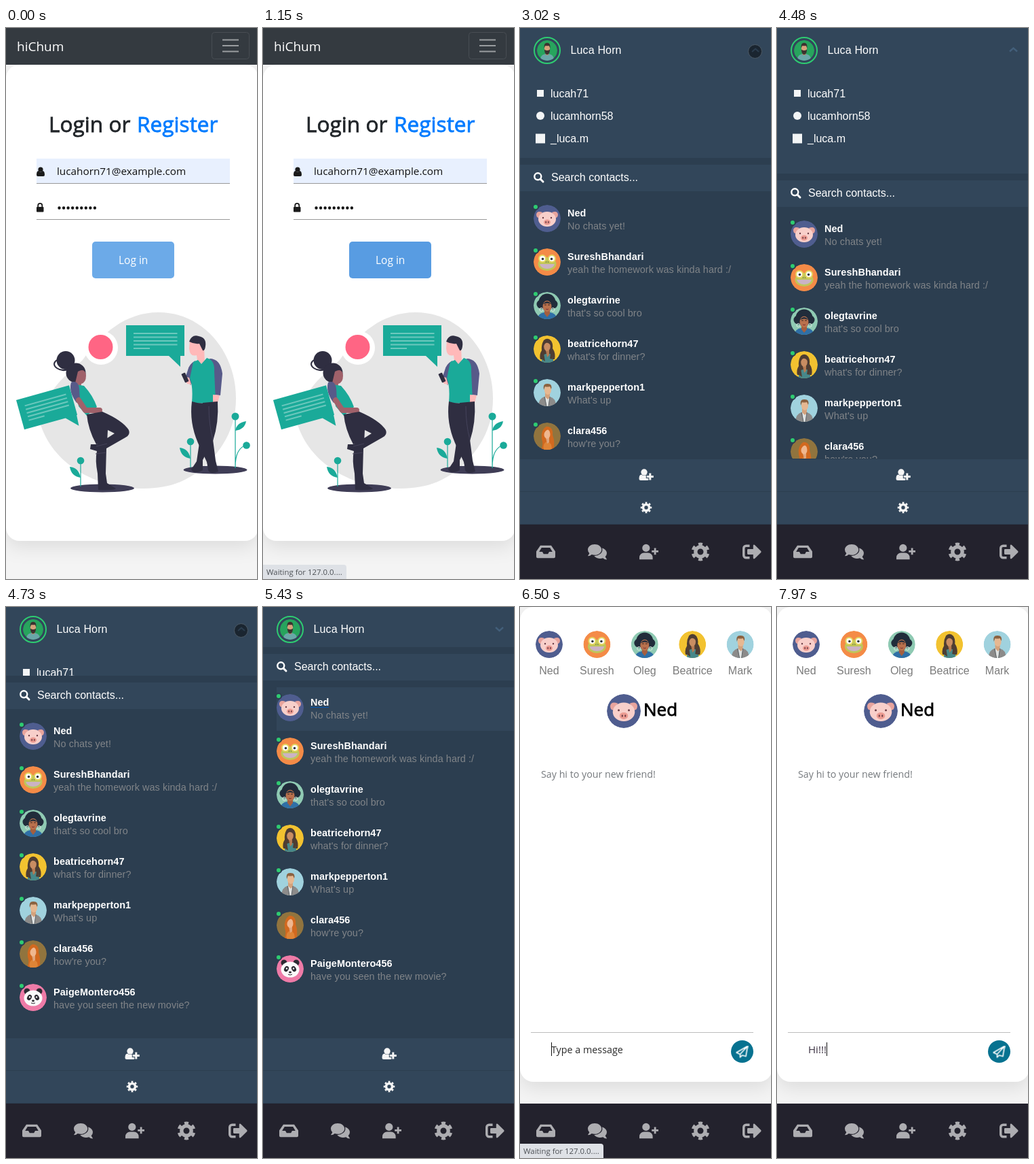
These frames come from a looping animation (370x810 px, 8 s). An HTML page:

```html
<!DOCTYPE html>
<html lang="en">
<head>
<meta charset="utf-8">
<title>Chat app</title>
<style>
html,body{margin:0;width:100%;height:100%;overflow:hidden;background:#f4f4f4}
svg{display:block}
#stage{width:370px;height:810px}
text{white-space:pre}
.ui{font-family:"Open Sans","Noto Sans",sans-serif}
.ar{font-family:"Liberation Sans",Arial,sans-serif;font-size:16px}
.name{font-weight:700;font-size:14.4px;letter-spacing:.1px;fill:#fff}
.last{font-size:14.4px;letter-spacing:.08px;fill:#808488}
.medium{stroke-width:.8}
.card{fill:#fff;filter:drop-shadow(0 10px 13px rgba(0,0,0,.09))}
.teal{fill:#1aaa99}.dark{fill:#2f2e41}.skin{fill:#ffb9b9}.brown{fill:#a0616a}.plum{fill:#575a89}
.stem{fill:none;stroke:#1aaa99;stroke-width:1.2}
.lines{stroke:#6cc8bd;stroke-width:2}

/* one shared 8 s clock; every value holds until the next key */
.t{animation:8s step-end infinite}
#login{animation-name:login}
#app{animation-name:app}
#chat{animation-name:chat}
#submit{animation-name:submit}
#wait{animation-name:wait}
.late{animation-name:late}
#slide{animation-name:slide}
.up{animation-name:up}
.down{animation-name:down}
#press{animation-name:press}
#hover{animation-name:hover}
#under{animation-name:under}
#sendicon{animation-name:sendicon}
#bar{animation-name:bar}
#hint{animation-name:hint}
#caret{animation-name:caret}
.k1{animation-name:k1}.k2{animation-name:k2}.k3{animation-name:k3}.k4{animation-name:k4}.k5{animation-name:k5}
@keyframes login{0%{opacity:1}23.125%,to{opacity:0}}
@keyframes app{0%{opacity:0}23.125%{opacity:1}73.5%,to{opacity:0}}
@keyframes chat{0%{opacity:0}73.5%,to{opacity:1}}
@keyframes submit{0%{fill:#6caae8}11.75%{fill:#62a2e4}12.625%,to{fill:#589ce2}}
@keyframes wait{0%{opacity:0}13.5%{opacity:.5}14.375%{opacity:1}33.625%{opacity:.8}34.625%{opacity:.5}
 35.625%{opacity:.2}36.625%{opacity:0}73.5%{opacity:1}83.125%{opacity:.8}84.125%{opacity:.6}
 85.125%{opacity:.4}86.125%{opacity:.2}87.125%,to{opacity:0}}
@keyframes late{0%{opacity:0}24.125%,to{opacity:1}}
@keyframes slide{0%{transform:translateY(0)}36.625%{transform:translateY(67px)}37.75%{transform:translateY(132px)}
 38.75%{transform:translateY(151px)}39.625%{transform:translateY(155px)}57.875%{transform:translateY(124px)}
 58.875%{transform:translateY(42px)}60%{transform:translateY(8px)}61%,to{transform:translateY(0)}}
@keyframes up{0%{opacity:0}36.625%{opacity:1}57.875%,to{opacity:0}}
@keyframes down{0%{opacity:0}24.125%{opacity:1}36.625%{opacity:0}57.875%,to{opacity:1}}
@keyframes press{0%{opacity:0}33.625%{opacity:1}39.625%{opacity:0}56.875%{opacity:1}61%,to{opacity:0}}
@keyframes hover{0%{opacity:0}66.625%,to{opacity:1}}
@keyframes under{0%{opacity:0}67.875%,to{opacity:1}}
@keyframes sendicon{0%{opacity:0}74.5%,to{opacity:1}}
@keyframes bar{0%{opacity:0}74.5%{opacity:.5}76.5%{opacity:.4}77.5%{opacity:.3}79.375%{opacity:.2}80.25%{opacity:.1}81.25%,to{opacity:0}}
@keyframes hint{0%{opacity:1}89%,to{opacity:0}}
@keyframes caret{0%{opacity:0;transform:translateX(0)}81.25%{opacity:1;transform:translateX(0)}
 87.125%{opacity:0;transform:translateX(0)}89%{opacity:1;transform:translateX(11px)}
 92.875%{opacity:1;transform:translateX(14px)}96.625%{opacity:1;transform:translateX(19px)}
 98.75%{opacity:1;transform:translateX(23px)}99.625%,to{opacity:1;transform:translateX(27px)}}
@keyframes k1{0%{opacity:0}89%,to{opacity:1}}
@keyframes k2{0%{opacity:0}92.875%,to{opacity:1}}
@keyframes k3{0%{opacity:0}96.625%,to{opacity:1}}
@keyframes k4{0%{opacity:0}98.75%,to{opacity:1}}
@keyframes k5{0%{opacity:0}99.625%,to{opacity:1}}
</style>
</head>
<body>
<svg id="stage" viewBox="0 0 370 810">
<defs>
 <clipPath id="disc"><circle r="20"/></clipPath>

 <!-- avatars, 40 px wide around the origin -->
 <g id="pig" clip-path="url(#disc)"><circle r="20" fill="#4f5d8f"/>
  <path d="M-7-9Q-15-12-16-6Q-16-1-12-1ZM7-9Q15-12 16-6Q16-1 12-1Z" fill="#e8a49d"/>
  <ellipse cy="1" rx="13" ry="11" fill="#f8cfca"/><ellipse cy="5.5" rx="5" ry="4" fill="#ec9b92"/>
  <g fill="#6b3d45"><circle cx="-6" cy="-1" r="1.2"/><circle cx="6" cy="-1" r="1.2"/><ellipse cx="-1.8" cy="5.5" rx=".9" ry="1.4"/><ellipse cx="1.8" cy="5.5" rx=".9" ry="1.4"/></g></g>
 <g id="frog" clip-path="url(#disc)"><circle r="20" fill="#f48b47"/>
  <ellipse cy="3" rx="13.5" ry="10" fill="#bfc65a"/><g fill="#e5d65f"><circle cx="-7" cy="-5" r="6"/><circle cx="7" cy="-5" r="6"/></g>
  <g fill="#fff"><circle cx="-7" cy="-5" r="4"/><circle cx="7" cy="-5" r="4"/></g><g fill="#33373f"><circle cx="-6.5" cy="-4.5" r="1.8"/><circle cx="6.5" cy="-4.5" r="1.8"/></g>
  <path d="M-11 3H11Q9 10 0 10T-11 3Z" fill="#cbb3c4"/><circle cx="-1.5" cy="0" r=".8" fill="#667038"/><circle cx="1.5" cy="0" r=".8" fill="#667038"/></g>
 <g id="afro" clip-path="url(#disc)"><circle r="20" fill="#8fcab3"/>
  <circle cy="-5" r="12.500" fill="#212c3b"/><circle cx="-9" cy="-2" r="6.500" fill="#212c3b"/><circle cx="9" cy="-2" r="6.500" fill="#212c3b"/>
  <path d="M-15 20Q-13 11-4 10H4Q13 11 15 20Z" fill="#2f6fa6"/><path d="M-4 6H4V12L0 17L-4 12Z" fill="#a45f3f"/>
  <ellipse cy="1" rx="6.5" ry="8.2" fill="#b9714d"/><path d="M-6-2Q0-10 6-2Q0-5-6-2" fill="#212c3b"/>
  <path d="M-4-1H-1M1-1H4" stroke="#3b2420"/><path d="M-2 5Q0 6.5 2 5" stroke="#7d2f32" fill="none"/>
  <g fill="none" stroke="#dce6df"><circle cx="-8.5" cy="6" r="2.6"/><circle cx="8.5" cy="6" r="2.6"/></g></g>
 <g id="wavy" clip-path="url(#disc)"><circle r="20" fill="#f2c230"/>
  <path d="M-5-13Q1-18 6-12Q9-7 8-1Q13 6 11 15H-10Q-12 8-8 2Q-9-6-5-13Z" fill="#4e3d33"/>
  <path d="M-8 20Q-9 8-2 7H4Q10 9 9 20Z" fill="#47888a"/><path d="M-2 2H3V9L0 12Z" fill="#b67a52"/><ellipse cy="-4" rx="4.8" ry="7" fill="#c98d62"/>
  <path d="M-5-5Q-1-13 5-6Q6-11 0-13T-5-5ZM-6 0L-3 18L-9 14ZM6 0L4 14L9 15Z" fill="#4e3d33"/></g>
 <g id="suit" clip-path="url(#disc)"><circle r="20" fill="#a0d2de"/>
  <path d="M-13 20Q-12 8-4 6H4Q13 8 13 20Z" fill="#8c8b8a"/><path d="M-3 5H4L2 20H-1Z" fill="#dfe2e1"/><path d="M-3 0H4V7L1 10L-3 6Z" fill="#d3a27c"/>
  <ellipse cx="1" cy="-4" rx="5" ry="7" fill="#e6b891"/><path d="M-5-4Q-7-14 1-13Q8-13 6-5L4-9Q-1-8-3-9Z" fill="#8b6240"/>
  <path d="M-4 6L-1 20M4 6L2 20" stroke="#5e6468"/></g>
 <g id="ginger" clip-path="url(#disc)"><circle r="20" fill="#91743e"/>
  <path d="M-7-7Q-4-15 2-14Q9-12 8-2Q12 9 9 20H-9Q-5 12-8 4Q-9-2-7-7Z" fill="#d2691f"/>
  <path d="M-5 20Q-7 10 0 8Q7 9 7 20Z" fill="#df8436"/><path d="M-2 2H3V9L0 11Z" fill="#dfa57c"/><ellipse cy="-3" rx="4.6" ry="6.8" fill="#efb78f"/>
  <path d="M-5-2Q-3-9 2-10Q5-7 5-1Q8-8 2-13T-5-2Z" fill="#d2691f"/></g>
 <g id="panda" clip-path="url(#disc)"><circle r="20" fill="#ee7ba7"/>
  <g fill="#2d2b33"><circle cx="-9" cy="-9" r="4.5"/><circle cx="9" cy="-9" r="4.5"/></g><ellipse cy="1" rx="13.5" ry="11.5" fill="#fafafa"/>
  <g fill="#2d2b33"><ellipse cx="-5.5" cy="0" rx="3.2" ry="4.2" transform="rotate(30 -5.5 0)"/><ellipse cx="5.5" cy="0" rx="3.2" ry="4.2" transform="rotate(-30 5.5 0)"/><ellipse cy="5" rx="2" ry="1.4"/></g>
  <circle cx="-5" cy="-.5" r="1.2" fill="#fff"/><circle cx="5" cy="-.5" r="1.2" fill="#fff"/><path d="M-3 8Q0 10 3 8" fill="none" stroke="#2d2b33"/></g>
 <g id="beard" clip-path="url(#disc)"><circle r="20" fill="#27a45d"/>
  <path d="M-14 20Q-13 8-4 7H4Q13 8 14 20Z" fill="#6aa7a8"/><path d="M-3 2H3V9H-3Z" fill="#b98460"/><ellipse cy="-4" rx="5.5" ry="8" fill="#d6a27b"/>
  <path d="M-6-4Q-7-15 0-15T6-4L4-9H-4ZM-5.5-2Q0 2 5.5-2Q5 8 0 8T-5.5-2Z" fill="#3c3230"/></g>

 <!-- icons -->
 <g id="inbox"><path fill-rule="evenodd" d="M-8-9.3H8L14-.5V7.3Q14 9.3 12 9.3H-12Q-14 9.3-14 7.3V-.5ZM-6.2-6L-9.8 0H-5L-3.2 3.2H3.2L5 0H9.8L6.2-6Z"/></g>
 <path id="bubble" d="M-3.9-10.9C1.7-10.9 6.2-7.4 6.2-3.1S1.7 4.7-3.9 4.7Q-6.300 4.700-8.300 4Q-10.500 6.200-13.600 6.200Q-14.200 6-13.700 5.400Q-12.200 3.800-11.700 1.900Q-14-.2-14-3.100C-14-7.400-9.500-10.900-3.900-10.900Z"/>
 <g id="talk"><use href="#bubble" transform="matrix(-1 0 0 1 0 5.2)"/><use href="#bubble" stroke="#23222d" stroke-width="2.400" paint-order="stroke"/></g>
 <g id="adduser"><circle cx="-4.200" cy="-5.600" r="5.600"/><path d="M-14 11.200V8.200A6.800 6.800 0 0 1-7.200 1.400H-1.200A6.800 6.800 0 0 1 5.600 8.200V11.200ZM7.700-5.600H10.500V-2.100H14V.7H10.500V4.200H7.700V.7H4.200V-2.100H7.700Z"/></g>
 <g id="friend"><circle cx="-3" cy="-4" r="4.700"/><path d="M-10.500 5.500Q-10.500-.5-7-.5Q-3 2.500 1-.5Q5-.5 5 5.500Q5 8 2 8H-8Q-10.500 8-10.500 5.500Z"/>
  <path d="M4.300-2.500H7.300V1H10.800V4H7.300V7.500H4.300V4H.8V1H4.300Z" stroke="#32465a" stroke-width="2" paint-order="stroke"/></g>
 <g id="gear" fill="none" stroke-width="5.4"><circle r="7.2"/><circle r="10.8" pathLength="12" stroke-dasharray="1 1" stroke-dashoffset=".5" transform="rotate(-90)"/></g>
 <g id="cog" fill="none"><circle r="4.5" stroke-width="3.6"/><circle r="6.9" stroke-width="2.8" pathLength="16" stroke-dasharray="1 1" stroke-dashoffset=".5"/></g>
 <g id="exit"><path d="M-3.500-8.750H-8.750A3.500 3.500 0 0 0-12.250-5.250V5.250A3.500 3.500 0 0 0-8.750 8.750H-3.500" fill="none" stroke="#adadb1" stroke-width="3.500"/>
  <path d="M-5.700-3.900H1.750V-9.200Q2.400-11.400 4-10.100L13.200-.9Q14 0 13.200.9L4 10.100Q2.400 11.400 1.750 9.200V3.900H-5.700Q-7 3.900-7 2.600V-2.600Q-7-3.900-5.700-3.900Z"/></g>
 <g id="nav"><rect y="730" width="370" height="80" fill="#23222d"/>
  <g fill="#adadb1"><use href="#inbox" x="38" y="770"/><use href="#talk" x="114" y="770"/><use href="#adduser" x="190" y="770"/><use href="#gear" x="266" y="770" stroke="#adadb1"/><use href="#exit" x="342" y="770"/></g></g>
 <g id="leaf"><path class="stem" d="M0 0V38"/><circle r="5.3" class="teal"/><path class="teal" d="M0 25Q-14 23-16 9Q-3 10 0 25Z"/></g>
</defs>

<g id="login" class="t">
 <rect width="370" height="810" fill="#f4f4f4"/>
 <rect class="card" y="54" width="372" height="700" rx="20"/>
 <rect width="370" height="54" fill="#343a40"/>
 <text class="ui" x="16" y="34" font-size="19" fill="#fff">hiChum</text>
 <rect x="303.5" y="6.5" width="55" height="39" rx="4" fill="none" stroke="#484d53"/>
 <path d="M319 17.5H343M319 26H343M319 34.5H343" stroke="#9a9da0" stroke-width="2"/>
 <text class="ui medium" y="153" font-size="31.6"><tspan x="63" fill="#212529" stroke="#212529">Login or </tspan><tspan x="193" fill="#007bff" stroke="#007bff">Register</tspan></text>
 <rect x="45" y="192" width="285" height="36" fill="#e8f0fe"/>
 <path d="M45 228.5H330M45 281.5H330" stroke="#999"/>
 <g fill="#1b1b1b"><circle cx="51" cy="208" r="3.6"/><path d="M45 216Q45 210 48 210Q51 213 54 210Q57 210 57 216Q57 218 55 218H47Q45 218 45 216Z"/>
  <rect x="45" y="263" width="10.5" height="7.5" rx="1"/></g>
 <path d="M47.2 263.5V261A3 3 0 0 1 53.3 261V263.5" fill="none" stroke="#1b1b1b" stroke-width="1.8"/>
 <text class="ui" x="75" y="216" font-size="15.3" fill="#111">lucahorn71@example.com</text>
 <path d="M78.5 264.5H132" stroke="#111" stroke-width="4.4" stroke-linecap="round" stroke-dasharray="0 6.55"/>
 <rect id="submit" class="t" x="127" y="314" width="121" height="54" rx="5" fill="#6caae8"/>
 <text class="ui" x="187.7" y="347" font-size="15.5" fill="#fff" text-anchor="middle">Log in</text>

 <path d="M225 418C290 418 339 475 339 545C339 590 317 624 287 649C264 668 237 677 203 677C130 677 68 640 50 580C58 530 92 508 113 488C141 449 176 418 225 418Z" fill="#e6e6e6"/>
 <circle cx="140" cy="470" r="25" fill="#fff"/><circle cx="139.5" cy="469" r="18" fill="#ff6584"/>
 <path class="teal" d="M177 437H263V482H257V498L240 482H177Z"/>
 <path class="lines" d="M188 449H252.5M188 454.5H252.5M188 460H252.5M188 465.5H252.5M188 471H212"/>
 <g transform="rotate(-15.5 15 547)"><path class="teal" d="M15 547H96V592H95L94 608L78 592H15Z"/>
  <path class="lines" d="M25 558.5H88M25 564H88M25 569.5H88M25 575H88M25 580.5H49"/></g>
 <ellipse cx="142" cy="676.5" rx="47" ry="6" fill="#3f3d56"/>
 <ellipse cx="308.5" cy="649.5" rx="47" ry="6" fill="#3f3d56"/>
 <use href="#leaf" x="110" y="636"/><use href="#leaf" x="272" y="608"/>
 <path class="stem" d="M338 571V647M338 645Q338 618 354 613"/><circle cx="338" cy="571" r="5.5" class="teal"/><circle cx="354.5" cy="613.5" r="5.3" class="teal"/>
 <path class="teal" d="M338 592Q340 580 354 578Q352 590 338 592Z"/>

 <!-- woman -->
 <path d="M75 488Q67 494 75 500Q82 505 91 502" fill="none" stroke="#2f2e41" stroke-width="2"/>
 <circle class="dark" cx="88" cy="488.5" r="13.5"/><ellipse class="dark" cx="103" cy="507" rx="14.5" ry="14.5"/>
 <path class="brown" d="M106 505Q117 499 118 511Q118 521 111 523L110 530L101 526Z"/>
 <path class="teal" d="M103 524L115 526Q128 540 134 557L119 570L107 556Z"/>
 <path class="plum" d="M96 521Q106 517 108 530L109 548L104 551Q92 535 96 521Z"/>
 <path d="M107 547L117 562H138" fill="none" stroke="#a0616a" stroke-width="8" stroke-linecap="round" stroke-linejoin="round"/>
 <path class="dark" d="M119 568L142 564Q172 577 181 591Q184 598 176 602L148 618L147 655L149 669L162 677Q160 680 136 679L135 655Q131 635 134 622L124 619L125 612L135 612L160 596L150 591L149 610L133 612Q121 590 119 568Z"/>
 <path d="M133 615L149 611M132 626L148 624" stroke="#444258"/>

 <!-- man -->
 <path class="skin" d="M271 459Q286 455 292 469L293 492L283 495L281 481Q271 484 270 471Z"/>
 <path class="dark" d="M270 461Q274 450 284 453Q296 455 294 468Q293 475 290 474L285 464Q277 465 270 461Z"/>
 <path class="plum" d="M279 489Q270 494 268 503L265 512L272 525L281 515ZM300 486Q316 486 319 508L316 540L306 539L307 515Z"/>
 <path class="teal" d="M276 491L283 488L288 494L296 485Q308 488 307 505L309 549Q292 554 274 550Q276 527 271 515Z"/>
 <path class="skin" d="M305 539L315 540L312 551L305 550ZM261 512L270 514L273 524L267 523Z"/>
 <rect class="dark" x="261" y="507" width="6" height="14" rx="1" transform="rotate(-25 264 514)"/>
 <path class="dark" d="M290 551L312 549Q314 580 305 607L290 635V650Q277 657 273 649L281 637L285 610Q284 580 290 551Z"/>
 <path class="dark" d="M274 549Q285 553 300 551Q300 580 305 605L309 636L313 652Q301 657 298 650L296 638L283 610Q270 580 274 549Z"/>
 <path d="M299 556Q299 583 305 605" fill="none" stroke="#45435b"/>
</g>

<g id="app" class="t">
 <rect width="370" height="810" fill="#32465a"/>
 <g fill="#f3f5f6"><rect x="25" y="91" width="10" height="10"/><circle cx="30" cy="129" r="6"/><rect x="23" y="155.5" width="14" height="14"/></g>
 <g class="ar" fill="#fff"><text x="45" y="102">lucah71</text><text x="45" y="135">lucamhorn58</text><text x="45" y="168">_luca.m</text></g>
 <g id="slide" class="t">
  <rect y="59" width="370" height="760" fill="#2c3e50"/>
  <rect y="69" width="370" height="39" fill="#32465a"/>
  <g class="t late" fill="none" stroke="#fff"><circle cx="26.3" cy="86.3" r="5" stroke-width="2.4"/><path d="M30 90L34 94" stroke-width="3" stroke-linecap="round"/></g>
  <text class="ar" x="46" y="93" fill="#fff">Search contacts...</text>
  <rect id="hover" class="t" x="20" y="118" width="350" height="64" fill="#32465a"/>
  <g id="rows"></g>
  <path id="under" class="t" d="M70 147.5H97" stroke="#0056b3"/>
 </g>
 <circle cx="40" cy="33" r="19" fill="none" stroke="#2ecc71" stroke-width="2"/>
 <use href="#beard" transform="translate(40 33) scale(.75)"/>
 <text class="ar" x="74.5" y="38" fill="#fff" letter-spacing=".15">Luca Horn</text>
 <g fill="none" stroke="#435f7a" stroke-width="2.4"><path class="t down" d="M343 30L348.5 35L354 30"/><path class="t up" d="M343 34.5L348.5 29.5L354 34.5"/></g>
 <g id="press" class="t"><circle cx="346.5" cy="34.5" r="10" fill="#17212b" fill-opacity=".9" stroke="#4d5a66"/><path d="M342 35L347 30.5L352 35" fill="none" stroke="#2b3d4e" stroke-width="2"/></g>
 <rect y="633" width="370" height="97" fill="#2c3e50"/>
 <path d="M0 634H370V681H0ZM0 682H370V729H0Z" fill="#32465a"/>
 <g class="t late" fill="#f5f5f5"><use href="#friend" x="186" y="657"/><use href="#cog" x="186" y="705" stroke="#f5f5f5"/></g>
 <use href="#nav"/>
</g>

<g id="chat" class="t">
 <rect width="370" height="810" fill="#f4f4f4"/>
 <rect class="card" width="372" height="698" rx="20"/>
 <g id="friends"></g>
 <use href="#pig" transform="translate(153 153) scale(1.25)"/>
 <text class="ui medium" x="182" y="160" font-size="26" fill="#000" stroke="#000">Ned</text>
 <text class="ui" x="31" y="251" font-size="14.25" fill="#75797d">Say hi to your new friend!</text>
 <path d="M16 625.5H344" stroke="#bdbdbd"/>
 <text id="hint" class="ui t" x="46" y="656" font-size="14.3" fill="#2b2b2b">Type a message</text>
 <g class="ui" font-size="15" fill="#3a3040"><text class="t k1" x="46" y="656">H</text><text class="t k2" x="57" y="656">i</text><text class="t k3" x="61" y="656">!</text><text class="t k4" x="65" y="656">!</text><text class="t k5" x="69" y="656">!</text></g>
 <rect id="caret" class="t" x="46" y="640" width="1" height="20" fill="#111"/>
 <circle cx="327.5" cy="653.5" r="16.5" fill="#077290"/>
 <path id="sendicon" class="t" transform="translate(327.5 653.5)" d="M8-8L-8.5 1.5L-3 4V8.5L0 5.5L5.5 7ZM8-8L-3 4" fill="none" stroke="#fff" stroke-width="1.6" stroke-linejoin="round"/>
 <use href="#nav"/>
 <rect id="bar" class="t" x="368" y="2" width="2" height="782" fill="#777"/>
</g>

<g id="wait" class="t">
 <path d="M0 789H119Q123 789 123 793V810H0Z" fill="#dee1e6"/>
 <text class="ui" x="5" y="804" font-size="11.4" fill="#4c5055">Waiting for 127.0.0....</text>
</g>
</svg>
<script>
const contacts = [
  ["pig", "Ned", "No chats yet!", "Ned"],
  ["frog", "SureshBhandari", "yeah the homework was kinda hard :/", "Suresh"],
  ["afro", "olegtavrine", "that's so cool bro", "Oleg"],
  ["wavy", "beatricehorn47", "what's for dinner?", "Beatrice"],
  ["suit", "markpepperton1", "What's up", "Mark"],
  ["ginger", "clara456", "how're you?"],
  ["panda", "PaigeMontero456", "have you seen the new movie?"]
];
const fill = (id, html) => document.getElementById(id).innerHTML = html;

fill("rows", contacts.map(([face, name, last], i) => `
  <g transform="translate(0 ${64 * i})">
    <use href="#${face}" x="40" y="148"/>
    <circle cx="23" cy="131" r="4" fill="#2ecc71" stroke="#2c3e50" stroke-width="2"/>
    <text class="ar name" x="70" y="145">${name}</text>
    <text class="ar last" x="70" y="164">${last}</text>
  </g>`).join(""));

fill("friends", contacts.slice(0, 5).map(([face, , , first], i) => {
  const x = 43 + 70.4 * i;
  return `<use href="#${face}" x="${x}" y="55"/>
    <text class="ar" x="${x}" y="99" text-anchor="middle" fill="#7b7b7b">${first}</text>`;
}).join(""));
</script>
</body>
</html>
```
